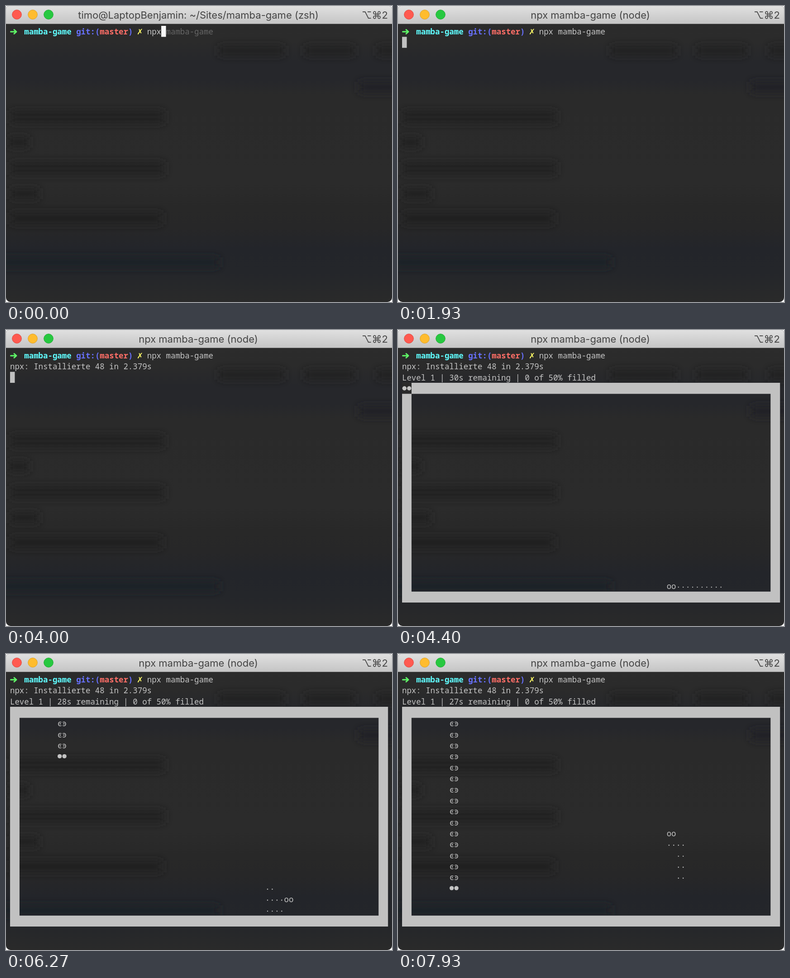
An HTML page for the animation above (8 s loop, 853 px wide and 656 px high).

```html
<!DOCTYPE html>
<html lang="en">
<head>
<meta charset="utf-8">
<title>Terminal game</title>
<style>
  html, body { margin: 0; width: 100%; height: 100%; overflow: hidden; background: #fff; }
  svg { display: block; width: 853px; height: 656px; }
  text { white-space: pre; }
  .mono { font: 17.4px 'Noto Sans Mono', 'DejaVu Sans Mono', monospace; }
  .bold { font-weight: 700; }
  .trail { font-family: 'DejaVu Sans Mono', monospace; font-size: 17.33px; }
  .title { font: 22px Inter, Roboto, sans-serif; fill: #444; }
</style>
</head>
<body>
<svg viewBox="0 0 853 656">
  <defs>
    <linearGradient id="bar" x2="0" y2="1">
      <stop stop-color="#e0e0e0"/><stop offset="1" stop-color="#c5c5c5"/>
    </linearGradient>
    <linearGradient id="glass" x2="0" y2="1">
      <stop stop-color="#2c2c2c"/><stop offset=".12" stop-color="#2b2b2b"/>
      <stop offset=".19" stop-color="#26272b"/><stop offset=".25" stop-color="#26272b"/>
      <stop offset=".3" stop-color="#2a2a2a"/><stop offset=".6" stop-color="#2b2b2b"/>
      <stop offset=".68" stop-color="#282828"/><stop offset=".75" stop-color="#272728"/>
      <stop offset=".82" stop-color="#23252a"/><stop offset=".9" stop-color="#24262a"/>
      <stop offset="1" stop-color="#2a2a2a"/>
    </linearGradient>
    <filter id="soft" x="-20%" y="-100%" width="140%" height="300%"><feGaussianBlur stdDeviation="9"/></filter>
    <pattern id="shade" width="2.6" height="2.6" patternUnits="userSpaceOnUse">
      <path d="M0 0h1.2v1.2h-1.2zM1.3 1.3h1.2v1.2h-1.2z" fill="#b4b4b4"/>
    </pattern>
    <clipPath id="frame"><path d="M6 0H847a6 6 0 0 1 6 6V646a10 10 0 0 1-10 10H10a10 10 0 0 1-10-10V6a6 6 0 0 1 6-6z"/></clipPath>
  </defs>
  <g clip-path="url(#frame)">
    <rect width="853" height="656" fill="url(#glass)"/>
    <g id="blobs" filter="url(#soft)"></g>
    <rect width="853" height="39" fill="url(#bar)"/>
    <rect y="39" width="853" height="1" fill="#8f8f8f"/>
    <g id="lights"></g>
    <text class="title" id="title" x="425" y="27.5" text-anchor="middle"></text>
    <text class="title" x="844" y="27.5" text-anchor="end" style="font-family:Inter,'DejaVu Sans',sans-serif">⌥⌘2</text>
    <g id="prompt"></g>
    <g id="screen"></g>
  </g>
</svg>
<script>
const LEFT = 9, TOP = 44, COL = 10.44, ROW = 24.35;
const GREY = '#c1c1c1', TEXT = '#c4c4c4';
const STEP = 8000 / 120;
const $ = id => document.getElementById(id);
const colX = c => LEFT + c * COL;
const rowY = r => TOP + r * ROW;

const rect = (x, y, w, h, fill) => `<rect x="${x}" y="${y}" width="${w}" height="${h}" fill="${fill}"/>`;
const dot = (x, y, r, fill = TEXT) => `<circle cx="${x}" cy="${y}" r="${r}" fill="${fill}"/>`;
const text = (c, r, str, fill = TEXT, cls = '') =>
  `<text class="mono ${cls}" x="${colX(c)}" y="${rowY(r) + 19}" fill="${fill}">${str}</text>`;
const cursor = (c, r, fill = GREY) => rect(colX(c), rowY(r), COL, ROW, fill);
const pair = (c, r, dy, radius) =>
  [0.5, 1.5].map(k => dot(colX(c + k), rowY(r) + dy, radius)).join('');

// Static parts: blurred backdrop, window buttons, prompt
$('blobs').innerHTML = [
  [470, 88, 145, 22], [660, 88, 110, 22], [820, 88, 60, 22],
  [10, 232, 340, 28], [5, 290, 45, 24], [10, 346, 340, 28], [10, 404, 62, 24],
  [10, 458, 335, 26]
].map(b => rect(...b, '#242424')).join('') +
  rect(-10, 557, 480, 22, '#1f2125') + rect(780, 168, 90, 24, '#242125');

$('lights').innerHTML = [['#ff5a50', '#e0453d'], ['#ffbc2e', '#dfa022'], ['#27c840', '#1eaa30']]
  .map(([fill, rim], i) => `<circle cx="${24 + 35 * i}" cy="19" r="10.3" fill="${fill}" stroke="${rim}"/>`).join('');

$('prompt').innerHTML =
  '<path d="M10.5 57H22M18 52.5L23 57L18 61.5" fill="none" stroke="#5ff967" stroke-width="3" stroke-linecap="round" stroke-linejoin="round"/>' +
  text(3, 0, 'mamba-game', '#60fdff', 'bold') +
  text(14, 0, 'git:(', '#6871ff', 'bold') +
  text(19, 0, 'master', '#ff6e67', 'bold') +
  text(25, 0, ')', '#6871ff', 'bold') +
  `<text x="289" y="63" fill="#fefb67" style="font:bold 17px 'DejaVu Sans',sans-serif">✗</text>` +
  text(29, 0, 'npx');

// Snake head positions, one cell per tick
const DIRS = { L: [-1, 0], R: [1, 0], U: [0, -1], D: [0, 1] };
const SNAKE_START = 57, SNAKE_LENGTH = 6;
const snake = [[37, 18]];
for (const run of 'L14 U3 R4 D2 L2 U3 R D R D3 R U R3 U R2 D2 L U L D L4 U R2 U5 L U'.split(' ')) {
  const [dx, dy] = DIRS[run[0]];
  for (let i = +run.slice(1) || 1; i--;) {
    const [x, y] = snake[snake.length - 1];
    snake.push([x + dx, y + dy]);
  }
}

// Six-dot spinner; each bit is one dot, column by column
const SPINNER = [...'⠋⠙⠹⠸⠼⠴⠦⠧⠇⠏'].map(ch => ch.charCodeAt(0) & 63);
function spinner(tick) {
  let out = '';
  const bits = SPINNER[tick % 10];
  for (let i = 0; i < 6; i++)
    if (bits >> i & 1) out += dot(232 + 4 * (i > 2), 75.5 + 5 * (i % 3), 1);
  return out;
}

function progress(tick) {
  let out = `<path d="M15 73q-8 9 0 18M19 73q-8 9 0 18M208 73q8 9 0 18M212 73q8 9 0 18" fill="none" stroke="${TEXT}" stroke-width="1.2"/>`;
  out += rect(colX(1), 72, 7 * COL, 20, 'url(#shade)');
  for (let c = 8; c < 19; c++) out += dot(colX(c + 0.5), 81.5, 0.9);
  return out + spinner(tick + 6) + text(23, 1, 'extract:mamba-game: verb lock using /Users/timo/.npm/_lo');
}

function board(tick) {
  const steps = Math.max(0, Math.floor((tick - 76) / 2));
  const px = Math.min(steps, 5), py = Math.max(0, steps - 5);
  const seconds = 30 - Math.floor((tick - 62) / 15);
  const [x0, y0, x1, y1] = [colX(0), rowY(3), colX(80), rowY(23)];
  let out = text(0, 2, `Level 1 | ${seconds}s remaining | 0 of 50% filled`);
  out += `<path fill-rule="evenodd" fill="${GREY}" d="M${x0} ${y0}H${x1}V${y1}H${x0}zM${colX(2)} ${rowY(4)}H${colX(78)}V${rowY(22)}H${colX(2)}z"/>`;
  if (!py) out += rect(colX(2 * px), y0, 2 * COL, ROW, '#2a2a2a');
  for (let y = 1; y < py; y++) out += text(2 * px, y + 3, 'ͼͽ', TEXT, 'trail');
  out += pair(2 * px, py + 3, 12.2, 4.7);

  const head = tick - SNAKE_START;
  for (let i = Math.max(0, head - SNAKE_LENGTH + 1); i < head; i++)
    out += pair(2 * snake[i][0], snake[i][1] + 3, 14.5, 1.2);
  const [hx, hy] = snake[head];
  return out + text(2 * hx, hy + 3, 'oo');
}

const ACCEPT = 8, ENTER = 16, FETCH = 32, INSTALLED = 50, PLAY = 62;

function draw(tick) {
  $('title').textContent = tick < ENTER
    ? 'timo@LaptopBenjamin: ~/Sites/mamba-game (zsh)'
    : 'npx mamba-game (node)';
  let out = text(33, 0, 'mamba-game', tick < ACCEPT ? '#666' : TEXT);
  if (tick < ENTER) out += cursor(tick < ACCEPT ? 32 : 43, 0, '#f8f8f8');
  else if (tick < FETCH) out += cursor(0, 1);
  else if (tick < INSTALLED) out += progress(tick - 40);
  else {
    out += text(0, 1, 'npx: Installierte 48 in 2.379s');
    out += tick < PLAY ? cursor(0, 2) : board(tick);
  }
  $('screen').innerHTML = out;
}

let shown = -1;
const origin = performance.now();
function loop() {
  const t = (performance.now() - origin) % 8000;
  const tick = Math.min(119, Math.floor((t + 4) / STEP));
  if (tick !== shown) draw(shown = tick);
  requestAnimationFrame(loop);
}
loop();
</script>
</body>
</html>
```
